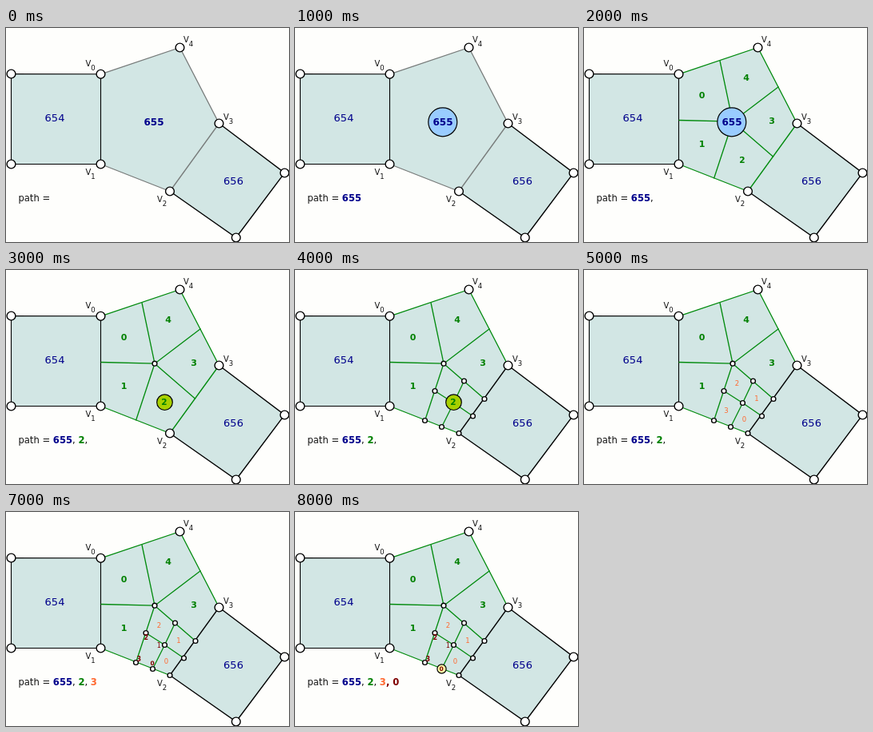
These frames come from a looping animation (354 by 268 pixels, 9 s). An HTML page with a canvas:

```html
<!DOCTYPE html>
<html lang="en">
<head>
<meta charset="utf-8">
<title>Cell path</title>
<style>
html, body { margin: 0; width: 100%; height: 100%; overflow: hidden; background: #fefefc; }
canvas { display: block; }
</style>
</head>
<body>
<canvas id="stage"></canvas>
<script>
const W = 354, H = 268, STEP = 1000, STEPS = 9;
const canvas = document.getElementById('stage');
const ctx = canvas.getContext('2d');
const dpr = window.devicePixelRatio || 1;
canvas.width = W * dpr;
canvas.height = H * dpr;
canvas.style.width = W + 'px';
canvas.style.height = H + 'px';
ctx.scale(dpr, dpr);

const FONT = '"DejaVu Sans", Verdana, sans-serif';
const FILL = '#d2e6e4', NAVY = '#00008b', GREEN = '#008000';
const LINE = '#008a0c', ORANGE = '#ff6a32', RED = '#800000';
const HALF = 0.5; // shapes sit on pixel centres

// Pentagon corners v0..v4, then the outer corners of both squares
const V = [[118, 57.3], [118, 170], [204.5, 204], [266, 119], [217, 24]];
const LEFT = [[6, 170], [6, 57]];
const RIGHT = [[348, 181], [287.3, 262]];
const CENTER = [185.5, 116.7];
const MIDS = [[118, 115], [162, 188], [236.5, 161], [243, 73], [169.5, 40.5]];
const SUB = [198, 166];
const SUBMIDS = [[183, 196], [222, 182.5], [211, 138.5], [174.5, 151]];

function trace(points, close) {
  ctx.beginPath();
  points.forEach(([x, y]) => ctx.lineTo(x + HALF, y + HALF));
  if (close) ctx.closePath();
}

function area(points) {
  trace(points, true);
  ctx.fillStyle = FILL;
  ctx.fill();
}

function line(points, color, width = 1.3) {
  trace(points);
  ctx.strokeStyle = color;
  ctx.lineWidth = width;
  ctx.stroke();
}

function disc([x, y], r, fill = '#fff', width = 1.4) {
  ctx.beginPath();
  ctx.arc(x + HALF, y + HALF, r, 0, Math.PI * 2);
  ctx.fillStyle = fill;
  ctx.fill();
  ctx.strokeStyle = '#000';
  ctx.lineWidth = width;
  ctx.stroke();
}

function text(str, x, y, size, color, bold, align = 'center') {
  ctx.font = (bold ? 'bold ' : '') + size + 'px ' + FONT;
  ctx.textAlign = align;
  ctx.fillStyle = color;
  ctx.fillText(str, x, y);
  return ctx.measureText(str).width;
}

function drawCells(step) {
  area([V[0], V[1], ...LEFT]);
  area([V[3], V[2], RIGHT[1], RIGHT[0]]);
  area(V);
  const edge = step < 2 ? '#777b7a' : LINE;
  line([V[1], V[2]], edge);
  line([V[3], V[4], V[0]], edge);
  line([V[2], V[3]], step < 4 ? edge : '#000');
  line([V[0], V[1], ...LEFT, V[0]], '#000', 1.1);
  line([V[3], ...RIGHT, V[2]], '#000', 1.4);
  if (step >= 2) MIDS.forEach(m => line([CENTER, m], LINE));
  if (step >= 4) SUBMIDS.forEach(m => line([SUB, m], LINE));
}

function drawNodes(step) {
  V.forEach((p, i) => {
    if (i !== 2 || step < 4) disc(p, 5.4);
  });
  [...LEFT, ...RIGHT].forEach(p => disc(p, 5.4));
  if (step >= 3) disc(CENTER, 2.9);
  if (step >= 4) {
    [MIDS[1], MIDS[2], V[2], SUB, ...SUBMIDS].forEach(p => disc(p, 2.9));
  }
}

function drawNames() {
  [[99.5, 48], [99.5, 184], [189, 218], [272, 115], [222, 18]].forEach(([x, y], i) => {
    text('V', x, y, 10, '#111', false, 'left');
    text(i, x + 6.8, y + 5, 8.5, '#111', false, 'left');
  });
}

function drawLabels(step) {
  text('654', 61, 117, 13, NAVY);
  text('656', 284.5, 196, 13, NAVY);

  if (step === 1 || step === 2) disc([184.3, 117.3], 18, '#99ccff', 1.2);
  if (step < 3) text('655', 185, 122, 12, NAVY, true);

  if (step >= 2) {
    [[147.5, 88], [147.5, 149], [197.5, 169], [235, 120], [203, 66]].forEach(([x, y], i) => {
      if (i !== 2) text(i, x, y, 11, GREEN, true);
    });
    if (step === 3 || step === 4) disc([198, 165.2], 9.8, '#a8d000', 1.2);
    if (step < 5) text('2', 197.8, 169.3, 10.5, GREEN, true);
  }

  if (step >= 5) {
    if (step === 6) disc([177.5, 175.5], 6.7, '#ffe0b0', 1);
    [[200.5, 190], [216, 164], [191.5, 145], [178, 178.5]].forEach(([x, y], i) => {
      if (i < 3 || step < 7) text(i, x, y, 8.5, ORANGE);
    });
  }

  if (step >= 7) {
    text('1', 191.3, 170, 8, RED);
    text('2', 175.3, 160, 8, RED, true);
    text('3', 166.3, 187, 8, RED, true);
    if (step === 7) {
      text('0', 183, 192, 7.5, RED, true);
    } else {
      disc(SUBMIDS[0], 5.6, '#ffffa8', 1.2);
      text('0', 183.2, 199, 7.5, RED, true);
    }
  }
}

// Each part: first step, string, colour, bold
const PATH = [
  [0, 'path = ', '#111'],
  [1, '655', NAVY, true],
  [2, ', ', '#111'],
  [3, '2', GREEN, true],
  [3, ', ', '#111'],
  [6, '3', ORANGE, true],
  [8, ', 0', RED, true]
];

function drawPath(step) {
  let x = 15.4;
  PATH.forEach(([from, str, color, bold]) => {
    if (step >= from) x += text(str, x, 217, 11.6, color, bold, 'left');
  });
}

let last = -1;
const start = performance.now();

function tick(now) {
  const step = Math.floor(Math.max(0, now - start) / STEP) % STEPS;
  if (step !== last) {
    last = step;
    ctx.fillStyle = '#fefefc';
    ctx.fillRect(0, 0, W, H);
    drawCells(step);
    drawNodes(step);
    drawNames();
    drawLabels(step);
    drawPath(step);
  }
  requestAnimationFrame(tick);
}
tick(start);
</script>
</body>
</html>
```
